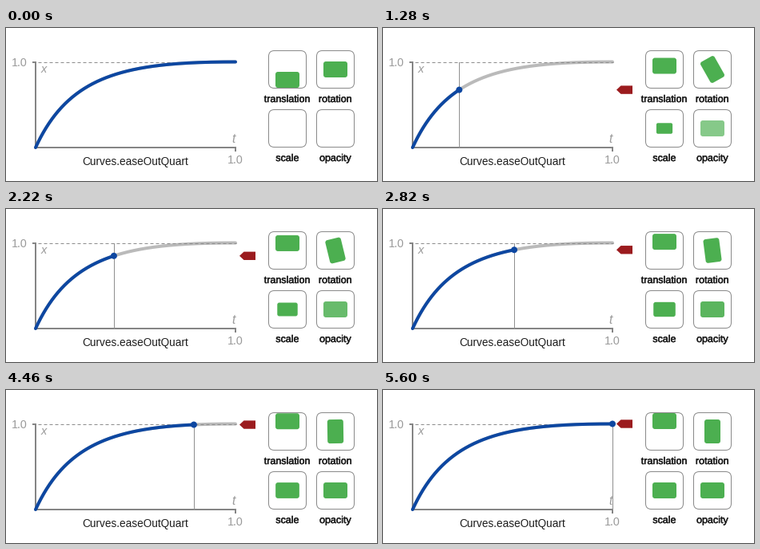
Animation of 464 by 192 pixels, one loop 5.62 s. Source, as a matplotlib script:

```python
import numpy as np
import matplotlib.pyplot as plt
from matplotlib.animation import FuncAnimation
from matplotlib.patches import Circle, FancyBboxPatch, Polygon
from matplotlib.patheffects import withStroke
from matplotlib.transforms import Affine2D

W, H, DPI = 464, 192, 64
PX = 72 / DPI
LOOP, TICK, STEPS = 5620, 20, 120
X0, X1, Y0, Y1 = 37, 287, 150, 42.5
BLUE, GREEN, RED = "#0d47a1", "#4caf50", "#9b1b1e"
AXIS, PALE, HINT = "#858585", "#bababa", "#9a9a9a"

plt.rcParams["font.family"] = "Liberation Sans"
plt.rcParams["toolbar"] = "None"

fig = plt.figure(figsize=(W / DPI, H / DPI), dpi=DPI, facecolor="white")
ax = fig.add_axes([0, 0, 1, 1])
ax.set(xlim=(0, W), ylim=(H, 0))
ax.axis("off")


def bezier(s, a, b):
    return 3 * (1 - s) ** 2 * s * a + 3 * (1 - s) * s**2 * b + s**3


S = np.linspace(0, 1, 2001)
TIMES = bezier(S, 0.165, 0.44)


def curve(s):
    """Stage position of the easing curve at Bezier parameter s."""
    x = X0 + (X1 - X0) * bezier(s, 0.165, 0.44)
    y = Y0 + (Y1 - Y0) * bezier(s, 0.84, 1.0)
    return x, y


def line(xs, ys, color, width, z, **kw):
    return ax.plot(xs, ys, color=color, lw=width * PX, zorder=z, **kw)[0]


def label(x, y, text, size, color="#1c1c1c", weight=0, **kw):
    t = ax.text(x, y, text, fontsize=size * PX, color=color,
                ha="center", va="baseline", zorder=4, **kw)
    if weight:
        t.set_path_effects([withStroke(linewidth=weight * PX,
                                       foreground=color)])


def rounded(x, y, w, h, r, **kw):
    box = FancyBboxPatch((x, y), w, h,
                         boxstyle=f"round,pad=0,rounding_size={r}", **kw)
    return ax.add_patch(box)


def block():
    """Green block centred on the origin, placed by its transform."""
    return rounded(-15, -10, 30, 20, 3, fc=GREEN, ec="none", zorder=3)


def place(patch, cx, cy, scale=1, angle=0):
    move = Affine2D().scale(scale).rotate_deg(angle).translate(cx, cy)
    patch.set_transform(move + ax.transData)


# Graph
line(*curve(S), PALE, 4, 1, solid_capstyle="round")
line([40, 288], [Y1, Y1], "#8c8c8c", 1, 2, linestyle=(0, (4, 3)))
line([X0, X0], [42, 151], AXIS, 2, 2, solid_capstyle="butt")
line([36, 288], [Y0, Y0], AXIS, 2, 2, solid_capstyle="butt")
line([33, 38], [Y1, Y1], AXIS, 2, 2, solid_capstyle="butt")
line([X1, X1], [150, 154.5], AXIS, 2, 2, solid_capstyle="butt")
label(17, 48, "1.0", 14.2, HINT)
label(287, 170.5, "1.0", 14.2, HINT)
label(47.3, 56, "x", 14.5, HINT, style="italic")
label(284.6, 144, "t", 15.5, HINT, style="italic")
label(162, 172, "Curves.easeOutQuart", 13.6)

# Sample boxes
for cx, cy, name in [(352, 52, "translation"), (412, 52, "rotation"),
                     (352, 126, "scale"), (412, 126, "opacity")]:
    rounded(cx - 23.5, cy - 23.5, 47, 47, 7, fc="none", ec="#8a8a8a",
            lw=PX, zorder=2)
    label(cx, cy + 41, name, 12.5, weight=0.5)

slide, spin, grow, fade = (block() for _ in range(4))
trace = line([], [], BLUE, 4, 5, solid_capstyle="round")
guide = line([], [], "#8f8f8f", 1, 3)
dot = ax.add_patch(Circle((0, 0), 4, fc=BLUE, ec="none", zorder=6))
pointer = ax.add_patch(Polygon([(0, 0)] * 3, fc=RED, ec="none", zorder=3))


def step_at(tick):
    """Steps last 20, 100 and 20 ms in turn."""
    cycle, r = divmod(tick, 7)
    return 3 * cycle + (r > 0) + (r > 5)


def draw(tick):
    step = step_at(tick)
    s = np.interp(step / STEPS, TIMES, S)
    v = bezier(s, 0.84, 1.0)
    x, y = curve(s)

    running = step > 0
    trace.set_data(*curve(np.linspace(0, s if running else 1, 200)))
    for part in (guide, dot, pointer):
        part.set_visible(running)
    guide.set_data([x, x], [Y1, Y0])
    dot.center = x, y
    pointer.set_xy([(292, y), (297.5, y - 5.2), (312, y - 5.2),
                    (312, y + 5.2), (297.5, y + 5.2)])

    place(slide, 352, 65 - 26 * v)
    place(spin, 412, 52, angle=90 * v)
    place(grow, 352, 126, scale=max(v, 1e-3))
    grow.set_visible(running)
    place(fade, 412, 126)
    fade.set_alpha(v)
    return trace, guide, dot, pointer, slide, spin, grow, fade


anim = FuncAnimation(fig, draw, frames=LOOP // TICK, interval=TICK,
                     init_func=lambda: draw(0), repeat=True, repeat_delay=0)
plt.show()
```
